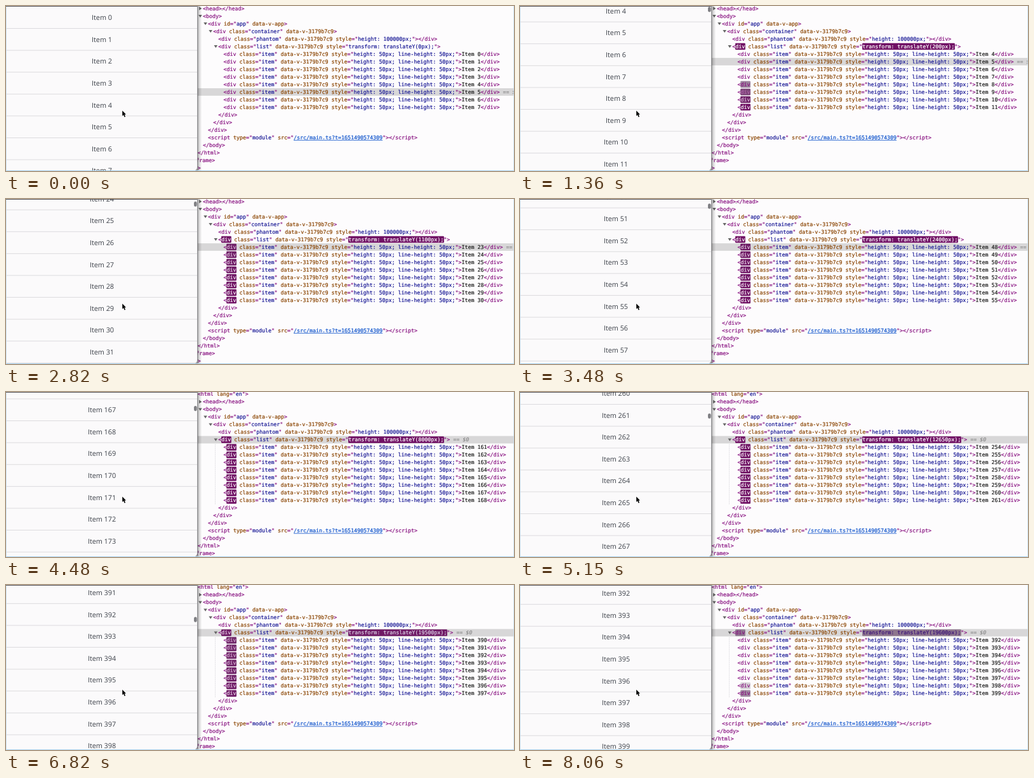
Animation, 800 px wide and 261 px high, one loop 8090 ms. Source, as an HTML page with a canvas:

```html
<!DOCTYPE html>
<html lang="en">
<head>
<meta charset="utf-8">
<title>Virtual list</title>
<style>
html, body { margin: 0; width: 100%; height: 100%; overflow: hidden; background: #fdfcfd; }
canvas { display: block; width: 800px; height: 261px; }
</style>
</head>
<body>
<canvas id="stage"></canvas>
<script>
const W = 800, H = 261, LOOP = 8090, TICK = 3.03;
const canvas = document.getElementById('stage');
const ctx = canvas.getContext('2d');
const dpr = window.devicePixelRatio || 1;
canvas.width = W * dpr;
canvas.height = H * dpr;

const TAG = '#881280', NAME = '#8a4400', VALUE = '#1a1a96', TEXT = '#222', LINK = '#1155cc';
const CHAR = 5, ROW = 12, PITCH = 34.6, PANEL = 301.5;
const LIST_LAG = 42, STYLE_LAG = 52, FADE = 1400, RESELECT = 3850;
const MONO = '8.306px "DejaVu Sans Mono", monospace';

// Scroll position in items: [ms, item, items per second]
const KEYS = [
  [0, 0, 0], [400, 1, 3.6], [1360, 4.3, 5.5], [2180, 10.465, 10], [3480, 50.62, 45],
  [4480, 166.71, 125], [5820, 324.4, 36], [6150, 350, 140], [6600, 390, 7],
  [6780, 391, 4.5], [7080, 392, 1.2], [7320, 392.14, 0]
];

function scrollAt(t) {
  if (t <= 0) return 0;
  for (let i = 1; i < KEYS.length; i++) {
    const [t1, p1, v1] = KEYS[i];
    if (t > t1) continue;
    const [t0, p0, v0] = KEYS[i - 1];
    const h = (t1 - t0) / 1000, u = (t - t0) / (t1 - t0), w = 1 - u;
    return p0 + (p1 - p0) * u * u * (3 - 2 * u) + h * (v0 * u * w * w - v1 * u * u * w);
  }
  return KEYS[KEYS.length - 1][1];
}

// Time at which each item reaches the top
const reached = [];
for (let k = 0; k <= 392; k++) {
  let a = 0, b = 7320;
  for (let n = 0; n < 24; n++) {
    const m = (a + b) / 2;
    if (scrollAt(m) < k) a = m; else b = m;
  }
  reached.push(b);
}

// Progress of a change highlight, or 1 when it is over
const glow = (t, k, lag) => k < 1 ? 1 : Math.min(1, Math.max(0, (t - lag - reached[k]) / FADE));

function mixWhite(rgb, f) {
  return 'rgb(' + rgb.map(c => Math.round(255 + (c - 255) * f)).join(',') + ')';
}

const tok = (s, c = TAG, hot = 1) => ({ s, c, hot });

function open(tag, attrs, hot = 1, styleHot = 1) {
  const out = [tok('<'), tok(tag, TAG, hot)];
  for (const [name, value] of attrs) {
    out.push(tok(' ' + name, NAME));
    if (value === undefined) continue;
    out.push(tok('="'), tok(value, name === 'src' ? LINK : VALUE, name === 'style' ? styleHot : 1), tok('"'));
  }
  out.push(tok('>'));
  return out;
}

const SCOPE = ['data-v-3179b7c9'];
const close = tag => [tok('</' + tag + '>')];
const indent = depth => 301.8 + depth * 8.13;

function drawTokens(tokens, x, y) {
  for (const { s, c, hot } of tokens) {
    const w = s.length * CHAR;
    ctx.fillStyle = c;
    if (hot < 1) {
      ctx.globalAlpha = 1 - Math.pow(hot, 2.4);
      ctx.fillStyle = `rgb(${112 - 20 * hot},${16 + 70 * hot},100)`;
      ctx.beginPath();
      ctx.roundRect(x - 0.3, y - 5.2, w + 0.8, 10.6, 1.2);
      ctx.fill();
      ctx.globalAlpha = 1;
      const base = c === VALUE ? [60, 18, 120] : [136, 18, 128];
      ctx.fillStyle = mixWhite(base, Math.min(1, hot * 1.6));
    }
    // A hairline outline gives the heavier desktop text weight
    ctx.strokeStyle = ctx.fillStyle;
    ctx.lineWidth = 0.22;
    ctx.strokeText(s, x, y + 3);
    ctx.fillText(s, x, y + 3);
    if (c === LINK) ctx.fillRect(x, y + 4, w, 0.8);
    x += w;
  }
  return x;
}

function drawArrow(x, y, down) {
  ctx.fillStyle = '#666';
  ctx.beginPath();
  if (down) {
    ctx.moveTo(x - 2.8, y - 2); ctx.lineTo(x + 2.8, y - 2); ctx.lineTo(x, y + 2.4);
  } else {
    ctx.moveTo(x - 1.8, y - 2.8); ctx.lineTo(x + 2.4, y); ctx.lineTo(x - 1.8, y + 2.8);
  }
  ctx.fill();
}

function treeRows(t) {
  const first = Math.floor(scrollAt(t - LIST_LAG) + 1e-6);
  const shift = Math.floor(scrollAt(t - STYLE_LAG) + 1e-6);
  const moved = glow(t, shift, STYLE_LAG);
  const rows = [];
  const add = (depth, tokens, arrow) => rows.push({ depth, tokens, arrow });

  add(0, open('html', [['lang', 'en']]));
  add(1, null, 'right');
  add(1, open('body', []), 'down');
  add(2, open('div', [['id', 'app'], ['data-v-app']]), 'down');
  add(3, open('div', [['class', 'container'], SCOPE]), 'down');
  add(4, open('div', [['class', 'phantom'], SCOPE, ['style', 'height: 100000px;']]).concat(close('div')));
  add(4, open('div', [['class', 'list'], SCOPE, ['style', `transform: translateY(${shift * 50}px);`]], moved, moved), 'down');
  for (let i = first; i < first + 8; i++) {
    const attrs = [['class', 'item'], SCOPE, ['style', 'height: 50px; line-height: 50px;']];
    add(5, open('div', attrs, glow(t, i - 7, LIST_LAG)).concat(tok('Item ' + i, TEXT), close('div')));
  }
  for (const d of [4, 3, 2]) add(d, close('div'));
  add(2, open('script', [['type', 'module'], ['src', '/src/main.ts?t=1651490574309']]).concat(close('script')));
  add(1, close('body'));
  add(0, close('html'));
  add(-2.15, close('iframe'));
  add(0, [tok('>')]);

  const selected = t >= RESELECT ? 6 : 7 + Math.max(0, 5 - first);
  return { rows, selected };
}

function drawTree(t) {
  const { rows, selected } = treeRows(t);
  const top = t >= RESELECT ? 3.4 : 3.9 - ROW;
  ctx.fillStyle = '#fdfcfd';
  ctx.fillRect(0, 0, W, H);
  ctx.fillStyle = '#d8d7d8';
  ctx.fillRect(PANEL, top + selected * ROW - 5.8, W - PANEL, 11.8);

  if (selected === 6) {
    ctx.strokeStyle = '#d5d3d8';
    ctx.lineWidth = 0.7;
    ctx.setLineDash([2, 1]);
    ctx.beginPath();
    ctx.moveTo(329.5, top + 6.6 * ROW);
    ctx.lineTo(329.5, top + 14.6 * ROW);
    ctx.stroke();
    ctx.setLineDash([]);
  }

  ctx.textAlign = 'left';
  rows.forEach(({ depth, tokens, arrow }, n) => {
    const x = indent(depth), y = top + n * ROW;
    ctx.font = MONO;
    if (arrow) drawArrow(x - 4, y, arrow === 'down');
    if (!tokens) {
      drawTokens(open('head', []), x, y);
      drawTokens(close('head'), x + 30.5, y);
      ctx.font = '5px "DejaVu Sans Mono", monospace';
      ctx.fillStyle = '#555';
      ctx.fillText('…', x + 29, y + 3);
      return;
    }
    const end = drawTokens(tokens, x, y);
    if (n === selected) {
      ctx.font = 'italic ' + MONO;
      ctx.fillStyle = '#777';
      ctx.fillText('== $0', end + CHAR, y + 3);
    }
  });
}

function panelPath() {
  ctx.beginPath();
  ctx.roundRect(-10, -10, PANEL + 10, H + 10, 6);
}

function drawPanel(t) {
  const pos = scrollAt(t);
  const shade = ctx.createLinearGradient(PANEL, 0, PANEL + 7, 0);
  shade.addColorStop(0, 'rgba(0,0,0,0.4)');
  shade.addColorStop(0.4, 'rgba(0,0,0,0.14)');
  shade.addColorStop(1, 'rgba(0,0,0,0)');
  ctx.fillStyle = shade;
  ctx.fillRect(PANEL - 6, 0, 13, H);

  ctx.save();
  panelPath();
  ctx.fillStyle = '#fbfafb';
  ctx.fill();
  ctx.clip();
  ctx.font = '10.8px "Open Sans", "Noto Sans", sans-serif';
  ctx.textAlign = 'center';
  const from = Math.max(0, Math.floor(pos) - 1);
  for (let i = from; i < from + 11; i++) {
    const y = 18.2 + (i - pos) * PITCH;
    ctx.fillStyle = '#3a3f47';
    ctx.fillText('Item ' + i, 151, y + 3.9);
    ctx.fillStyle = '#dcdbde';
    ctx.fillRect(0, y + 16.8, PANEL, 1);
  }

  const alpha = t < 30 ? 0 : Math.min(1, Math.max(0, (7950 - t) / 200));
  ctx.globalAlpha = alpha;
  ctx.fillStyle = '#808084';
  ctx.beginPath();
  ctx.roundRect(296, 0.8 + pos * 0.127, 4.6, 8.2, 2.3);
  ctx.fill();
  ctx.globalAlpha = 1;
  ctx.fillStyle = '#55555a';
  ctx.fillRect(0, 0, PANEL, 1);
  ctx.restore();

  panelPath();
  ctx.strokeStyle = '#8a898d';
  ctx.lineWidth = 0.9;
  ctx.stroke();
}

function drawFrame() {
  ctx.fillStyle = '#a9d2ee';
  ctx.fillRect(0, H - 1, W, 1);
  ctx.fillStyle = '#c6dff0';
  ctx.fillRect(0, 1, 0.8, H);
  ctx.fillRect(W - 0.8, 0, 0.8, H);
}

function drawCursor() {
  const pts = [[0, 0], [0, 8.6], [1.9, 6.9], [3.4, 10.3], [4.9, 9.6], [3.5, 6.4], [5.8, 6.2]];
  ctx.beginPath();
  pts.forEach(([x, y]) => ctx.lineTo(183.2 + x, 165.4 + y));
  ctx.closePath();
  ctx.lineJoin = 'round';
  ctx.strokeStyle = '#fff';
  ctx.lineWidth = 1.4;
  ctx.stroke();
  ctx.fillStyle = '#000';
  ctx.fill();
}

const start = performance.now();

function stepTime(ms) {
  const step = Math.floor((ms / 10 + 0.6) / TICK);
  return Math.min(8060, Math.round(step * TICK) * 10);
}

function render(now) {
  const t = stepTime(Math.max(0, now - start) % LOOP);
  ctx.setTransform(dpr, 0, 0, dpr, 0, 0);
  ctx.textRendering = 'geometricPrecision';
  drawTree(t);
  drawPanel(t);
  drawFrame();
  drawCursor();
  requestAnimationFrame(render);
}
render(start);
</script>
</body>
</html>
```
